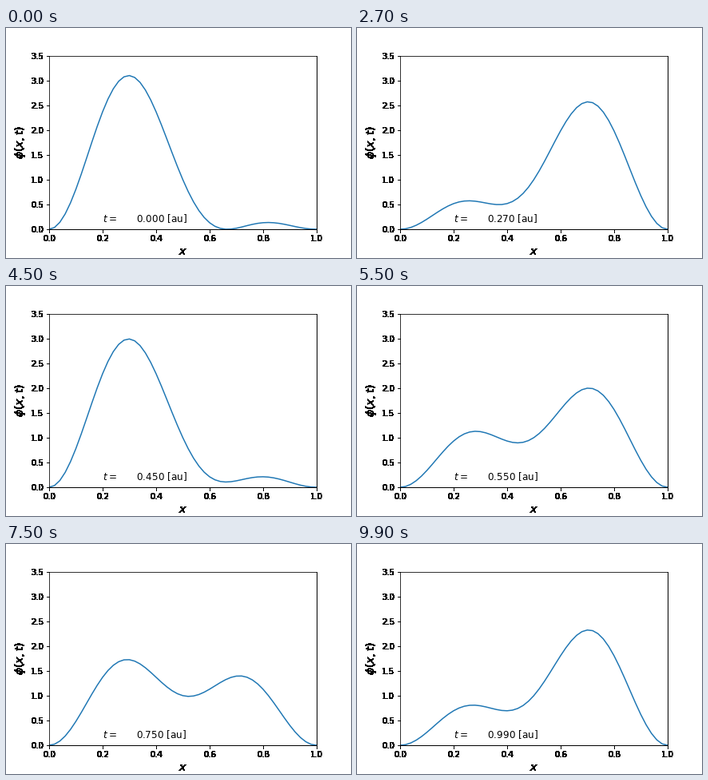
Animation, 432 px wide and 288 px high, one loop 10000 ms. Source, as a matplotlib script:

```python
import numpy as np
import matplotlib.pyplot as plt
from matplotlib.animation import FuncAnimation

FRAMES = 100
DT = 0.01
OMEGA = 1.5 * np.pi**2  # energy gap between the two lowest box states

plt.rcParams["font.family"] = "DejaVu Sans"


def harden(image, dpi):
    """Turn every touched pixel solid black, without antialiasing."""
    solid = np.zeros_like(image)
    solid[..., 3] = image[..., 3] > 0
    return solid, 0, 0


def density(x, t):
    a, b = np.sin(np.pi * x), np.sin(2 * np.pi * x)
    return a**2 + b**2 + 2 * a * b * np.cos(OMEGA * t)


fig = plt.figure(figsize=(6, 4), dpi=72, facecolor="white")
ax = fig.add_axes([0.125, 0.125, 0.775, 0.755])
ax.set_xlim(0, 1)
ax.set_ylim(0, 3.5)
ax.set_xticks(np.linspace(0, 1, 6))
ax.set_yticks(np.linspace(0, 3.5, 8))
ax.set_xlabel("$x$", fontsize=14)
ax.set_ylabel(r"$\phi(x,t)$", fontsize=14)

hard = [ax.xaxis.label, ax.yaxis.label, ax.spines["right"], ax.spines["bottom"]]
for axis in (ax.xaxis, ax.yaxis):
    for tick in axis.get_major_ticks():
        hard += [tick.label1, tick.tick1line]
for artist in hard:
    artist.set_agg_filter(harden)

x = np.linspace(0, 1, 51)
line, = ax.plot(x, density(x, 0), color="C0", lw=1.5)
clock = ax.text(0.2, 0.15, "", fontsize=12)


def update(i):
    t = i * DT
    line.set_ydata(density(x, t))
    clock.set_text(f"$t=$ {t:10.3f} [au]")
    return line, clock


anim = FuncAnimation(fig, update, frames=FRAMES, interval=100,
                     repeat=True, repeat_delay=0, blit=False)
plt.show()
```
